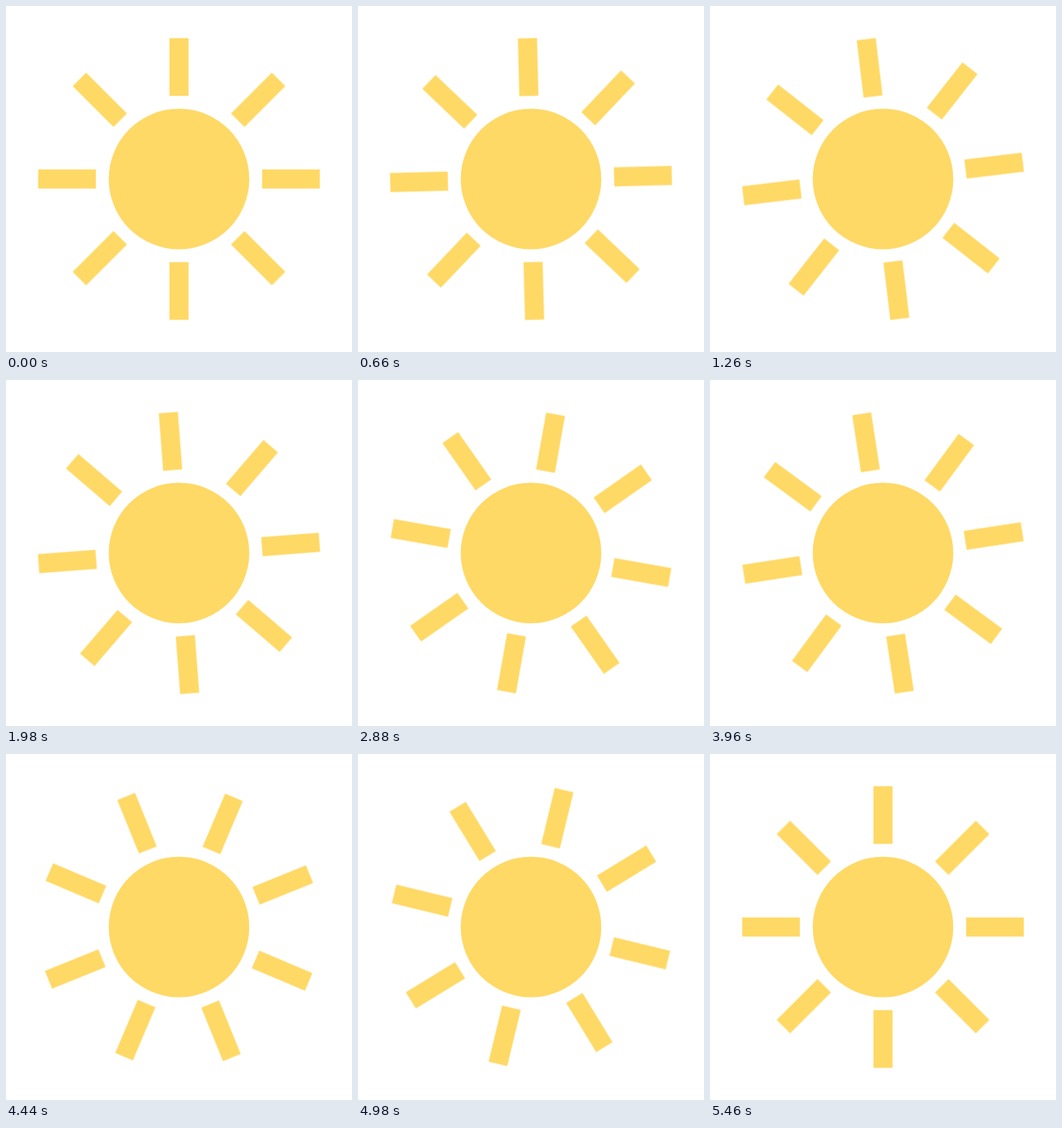
Write an HTML page that moves like this. It is 480 px wide and 480 px high and loops after 5520 ms.

```html
<!DOCTYPE html>
<html lang="en">
<head>
<meta charset="utf-8">
<title>Turning sun</title>
<style>
  html, body { margin: 0; width: 100%; height: 100%; overflow: hidden; background: #fff; }
  svg { display: block; width: 100%; height: 100%; fill: #ffd966; }
</style>
</head>
<body>
<svg viewBox="-240 -240 480 480">
  <circle r="97.5"/>
  <g id="rays"></g>
</svg>
<script>
  const STEP_MS = 60;
  const STEPS = 92;
  const DEGREES_PER_STEP = 3.959;
  const RAY_COUNT = 8;
  const rays = document.getElementById('rays');

  for (let i = 0; i < RAY_COUNT; i++) {
    const ray = document.createElementNS(rays.namespaceURI, 'rect');
    const box = { x: -13.3, y: -195.4, width: 26.6, height: 80.1 };
    for (const [name, value] of Object.entries(box)) ray.setAttribute(name, value);
    ray.setAttribute('transform', `rotate(${i * 360 / RAY_COUNT})`);
    rays.append(ray);
  }

  // One stepped turn, then the last step rests upright.
  const turnSteps = STEPS - 1;
  const offset = turnSteps / STEPS;
  rays.animate([
    { transform: 'rotate(0deg)', easing: `steps(${turnSteps}, end)` },
    { transform: `rotate(${turnSteps * DEGREES_PER_STEP}deg)`, offset },
    { transform: 'rotate(0deg)', offset },
    { transform: 'rotate(0deg)' }
  ], { duration: STEPS * STEP_MS, iterations: Infinity });
</script>
</body>
</html>
```
